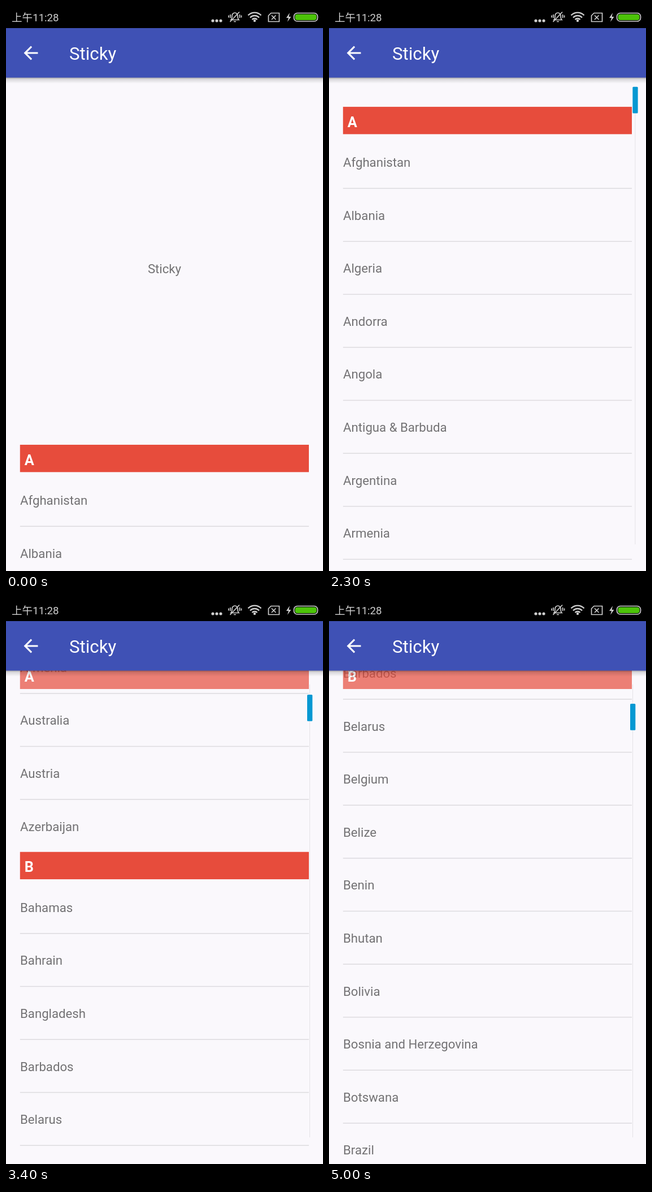
An HTML page that plays this animation: 561 by 998 pixels, repeating every 5100 ms.

```html
<!DOCTYPE html>
<html lang="en">
<head>
<meta charset="utf-8">
<title>Sticky list</title>
<style>
  html, body { margin: 0; width: 100%; height: 100%; overflow: hidden; background: #faf8fc; }
  svg { display: block; font-family: Roboto, sans-serif; }
  .row { font-size: 22.2px; fill: #737274; }
  .letter { font-size: 25.3px; font-weight: bold; fill: #fff; }
  .clock { font-size: 18.6px; font-family: Roboto, "Noto Sans CJK SC", "Noto Sans CJK", sans-serif; fill: #cfcfcf; }
  .icon { fill: none; stroke: #cfcfcf; stroke-width: 1.7; }
</style>
</head>
<body>
<svg width="561" height="998" viewBox="0 0 561 998">
  <defs>
    <linearGradient id="shade" x1="0" y1="0" x2="0" y2="1">
      <stop offset="0" stop-color="#000" stop-opacity=".36"/>
      <stop offset=".3" stop-color="#000" stop-opacity=".13"/>
      <stop offset="1" stop-color="#000" stop-opacity="0"/>
    </linearGradient>
  </defs>
  <rect width="561" height="998" fill="#faf8fc"/>
  <g id="rows"><text class="row" x="280.5" y="471.8" text-anchor="middle">Sticky</text></g>
  <g id="headers"></g>
  <g id="bar">
    <rect x="537" y="151" width="1" height="800" fill="#e4e2e6"/>
    <rect id="thumb" x="533" width="9.3" height="46.7" rx="1.5" fill="#0698d2"/>
  </g>

  <rect y="126" width="561" height="11" fill="url(#shade)"/>
  <rect y="39" width="561" height="87.5" fill="#3f51b5"/>
  <path transform="translate(25.3 64.3) scale(1.558)" fill="#fff"
    d="M20 11H7.83l5.59-5.59L12 4l-8 8 8 8 1.41-1.41L7.83 13H20z"/>
  <text x="112" y="95" font-size="31.2" fill="#fff">Sticky</text>

  <rect width="561" height="39" fill="#000"/>
  <text class="clock" x="10" y="27.3">上午11:28</text>
  <g fill="#cfcfcf">
    <circle cx="366" cy="26" r="2.6"/><circle cx="373" cy="26" r="2.6"/><circle cx="380" cy="26" r="2.6"/>
    <path d="M502 12l-6 9h4l-2 7 6.5-9h-4z"/>
  </g>
  <g class="icon">
    <path d="M398 24.5c2-2 2-4 2-7a5 5.5 0 0 1 10 0c0 3 0 5 2 7zM403 27.5h4M413 10.5L396.500 28M397 15v6M394 16.5v4M413.500 15v6M416.500 16.5v4"/>
    <path stroke-width="2.4" d="M428.500 16.5a16 16 0 0 1 23 0M432 20.5a11 11 0 0 1 16 0M435.500 24a6 6 0 0 1 9 0"/>
    <path d="M469 12.5h14.5v15H464.500v-10.5zM470 16.5l7.5 7.5M477.500 16.5L470 24"/>
    <rect x="509.5" y="12.5" width="42" height="14.5" rx="6"/>
  </g>
  <circle cx="440" cy="26" r="2.2" fill="#cfcfcf"/>
  <rect x="511.5" y="14.5" width="38" height="10.5" rx="4" fill="#4cc308"/>
</svg>
<script>
const LOOP = 5100, STEP = 100, PITCH = 93.6, HEADER = 48.3, PIN = 110.7;
const sections = {
  A: ["Afghanistan", "Albania", "Algeria", "Andorra", "Angola", "Antigua & Barbuda", "Argentina",
      "Armenia", "Australia", "Austria", "Azerbaijan"],
  B: ["Bahamas", "Bahrain", "Bangladesh", "Barbados", "Belarus", "Belgium", "Belize", "Benin",
      "Bhutan", "Bolivia", "Bosnia and Herzegovina", "Botswana", "Brazil"]
};
// time, scroll offset, speed
const scrollKeys = [[1500, 0, .5], [2000, 390.4, .74], [2700, 861.6, .7], [3100, 1151.6, .75],
  [3800, 1643, .15], [4000, 1657, 0], [4100, 1657, 0], [5000, 2102, .45]];
// scroll offset, thumb top
const thumbKeys = [[390, 136], [861.6, 151.5], [1151.6, 161], [1643, 176.5], [2102, 185]];

const $ = id => document.getElementById(id);
const headers = [];

function add(parent, tag, attrs, text = "") {
  const el = document.createElementNS("http://www.w3.org/2000/svg", tag);
  for (const name in attrs) el.setAttribute(name, attrs[name]);
  el.textContent = text;
  return parent.appendChild(el);
}

function buildList() {
  let y = 775;
  for (const [letter, names] of Object.entries(sections)) {
    const el = add($("headers"), "g", {});
    add(el, "rect", { x: 24.8, width: 511.2, height: HEADER, fill: "#e74c3c" });
    add(el, "text", { class: "letter", x: 32.7, y: 35.6 }, letter);
    headers.push({ el, home: y });
    y += 98.4;
    names.forEach((name, i) => {
      add($("rows"), "text", { class: "row", x: 25, y: y + 7.6 }, name);
      if (i < names.length - 1)
        add($("rows"), "rect", { x: 24.8, y: y + 44.9, width: 511.2, height: 1.5, fill: "#dddbdf" });
      y += PITCH;
    });
    y += 44.8 - PITCH;
  }
}

function segment(keys, x) {
  let i = 0;
  while (i < keys.length - 2 && x > keys[i + 1][0]) i++;
  const [a, b] = [keys[i], keys[i + 1]], span = b[0] - a[0];
  return { a, b, span, u: (x - a[0]) / span };
}

// Cubic Hermite curve through the scroll keys
function scrollAt(t) {
  if (t <= scrollKeys[0][0]) return 0;
  const { a, b, span, u } = segment(scrollKeys, t), v = 1 - u;
  return a[1] * v * v * (1 + 2 * u) + b[1] * u * u * (1 + 2 * v)
       + span * u * v * (a[2] * v - b[2] * u);
}

function thumbAt(offset) {
  const { a, b, u } = segment(thumbKeys, offset);
  return a[1] + (b[1] - a[1]) * u;
}

function draw(now) {
  const t = Math.floor(now % LOOP / STEP) * STEP, offset = scrollAt(t);
  $("rows").setAttribute("transform", `translate(0 ${-offset})`);
  headers.forEach(({ el, home }, i) => {
    const next = headers[i + 1];
    let pos = Math.max(home - offset, PIN);
    if (next) pos = Math.min(pos, next.home - offset - HEADER);
    el.setAttribute("transform", `translate(0 ${pos})`);
    el.setAttribute("opacity", pos <= PIN ? .7 : 1);
  });
  $("bar").setAttribute("visibility", t < 2200 ? "hidden" : "visible");
  $("bar").setAttribute("transform", `translate(${Math.max(0, 13 * (1 - (t - 2200) / 150))} 0)`);
  $("thumb").setAttribute("y", thumbAt(offset));
}

let start;
function tick(now) {
  start ??= now;
  draw(now - start);
  requestAnimationFrame(tick);
}
buildList();
draw(0);
requestAnimationFrame(tick);
</script>
</body>
</html>
```
